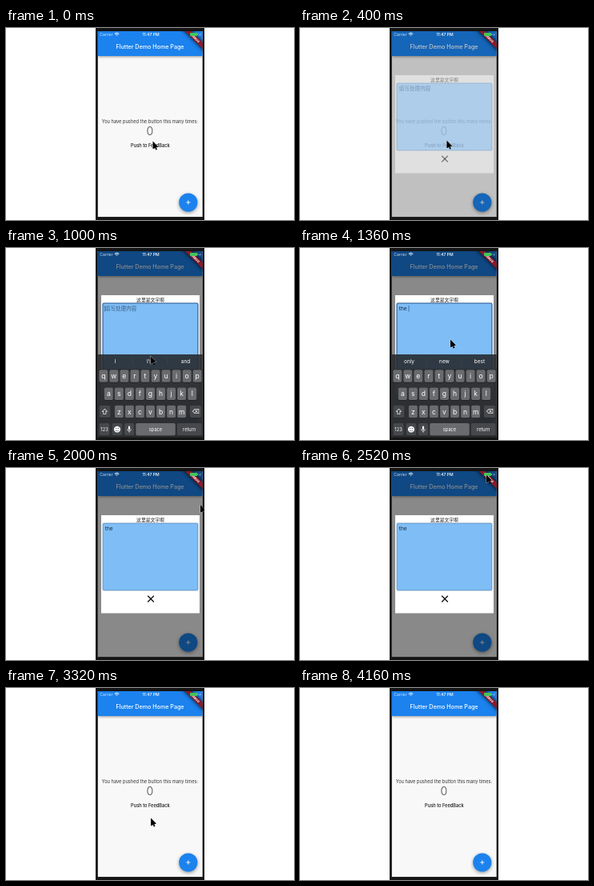
Write an HTML page with a canvas that moves like this. It is 360 by 240 pixels and loops after 4200 ms.

```html
<!DOCTYPE html>
<html lang="en">
<head>
<meta charset="utf-8">
<style>
html, body { margin: 0; width: 360px; height: 240px; overflow: hidden; background: #fff }
canvas { display: block; width: 360px; height: 240px }
</style>
</head>
<body>
<canvas id="stage"></canvas>
<script>
const LOOP = 4200, KEYBOARD_H = 104;
const OPEN = 320, FOCUS = 670, PICK = 1120, BLUR = 1660, CLOSE = 3040;
const LEFT = 114.6, TOP = 4, WIDTH = 131.2, HEIGHT = 232.3;
const SANS = 'Inter, "Noto Sans CJK SC", "Noto Sans CJK", "DejaVu Sans", sans-serif';
const BLUE = '#1b82ee', LIGHT_KEY = '#6a6b6e', DARK_KEY = '#46484b';
const canvas = document.getElementById('stage');
const ctx = canvas.getContext('2d');
const dpr = window.devicePixelRatio || 1;
canvas.width = 360 * dpr;
canvas.height = 240 * dpr;

// Places the pointer visits; each move takes at most MOVE ms and ends at time `at`.
const MOVE = 400;
const stops = [
  { at: 0, x: 183.5, y: 141.5 },
  { at: 760, x: 179, y: 108.5 },
  { at: 1080, x: 181, y: 140 },
  { at: 1360, x: 188, y: 114.5 },
  { at: 1680, x: 243, y: 46 },
  { at: 2520, x: 233, y: 8.5 },
  { at: 2900, x: 181, y: 162.5 },
  { at: 3760, x: 188, y: -14 }
];

const ramp = (t, start, length) => Math.min(1, Math.max(0, (t - start) / length));
const easeOut = p => 1 - (1 - p) ** 2;
const smooth = p => p * p * (3 - 2 * p);

function rect(x, y, w, h, fill, r = 0) {
  ctx.fillStyle = fill;
  ctx.beginPath();
  ctx.roundRect(x, y, w, h, r);
  ctx.fill();
}

function stroke(color, width) {
  ctx.strokeStyle = color;
  ctx.lineWidth = width;
  ctx.stroke();
}

function line(x1, y1, x2, y2, color, width) {
  ctx.beginPath();
  ctx.moveTo(x1, y1);
  ctx.lineTo(x2, y2);
  stroke(color, width);
}

function arc(x, y, r, from, to, color, width) {
  ctx.beginPath();
  ctx.arc(x, y, r, from * Math.PI, to * Math.PI);
  stroke(color, width);
}

function circle(x, y, r, fill) {
  rect(x - r, y - r, 2 * r, 2 * r, fill, r);
}

function text(s, x, y, size, color, weight = 400, align = 'center') {
  ctx.font = `${weight} ${size}px ${SANS}`;
  ctx.textAlign = align;
  ctx.fillStyle = color;
  ctx.fillText(s, x, y + size * 0.36);
}

function placed(x, y, angle, paint) {
  ctx.save();
  ctx.translate(x, y);
  ctx.rotate(angle);
  paint();
  ctx.restore();
}

function cross(x, y, r, angle, color, width) {
  placed(x, y, angle, () => {
    line(-r, 0, r, 0, color, width);
    line(0, -r, 0, r, color, width);
  });
}

function shadowed(color, blur, dy, paint) {
  ctx.save();
  ctx.shadowColor = color;
  ctx.shadowBlur = blur * dpr;
  ctx.shadowOffsetY = dy * dpr;
  paint();
  ctx.restore();
}

function homePage() {
  rect(LEFT, TOP, WIDTH, HEIGHT, '#f8f8f8');
  shadowed('#0006', 3, 1, () => rect(LEFT, TOP, WIDTH, 31, BLUE));
  text('Flutter Demo Home Page', 180, 23.5, 7.15, '#fff', 550);
  text('You have pushed the button this many times:', 180, 117.3, 5.7, '#333');
  text('0', 180, 129.2, 14.2, '#4a4a4a', 300);
  text('Push to FeedBack', 180.4, 147.3, 5.7, '#111', 500);
  shadowed('#0006', 4, 1.5, () => circle(227.8, 218, 11.6, BLUE));
  cross(227.8, 218, 2.6, 0, '#fff', 0.9);
}

function dialog(t) {
  const typed = t >= PICK, focused = t > FOCUS && t < BLUR;
  rect(119, 59, 123, 122.5, '#fff');
  text('这里是文字啊', 180.5, 64.7, 5.8, '#222');
  rect(121, 69, 119, 84, '#7fbdf6', 1.5);
  stroke(focused ? '#22548f' : '#4f7fae', focused ? 1.1 : 0.7);
  text(typed ? 'the' : '填写处理内容', 123.8, 76, 6.6, typed ? '#16283a' : '#3f6385', 400, 'left');
  const caret = typed ? 136 : 123.7;
  if (focused) line(caret, 72, caret, 79.6, '#24548c', 0.7);
  cross(181, 163.6, 5.4, Math.PI / 4, '#111', 1.3);
}

function key(x, y, w, label, size, fill = DARK_KEY) {
  rect(x - w / 2, y - 7.8, w, 16.2, '#1b1c1e', 1.8);
  rect(x - w / 2, y - 7.8, w, 15.6, fill, 1.8);
  text(label, x, y, size, '#fff');
}

function microphone(x, y) {
  rect(x - 1.1, y - 4.3, 2.2, 5, '#fff', 1.1);
  arc(x, y - 0.4, 2.4, 0, 1, '#fff', 0.7);
  line(x, y + 2, x, y + 4, '#fff', 0.7);
}

function keyboard(t, top) {
  ctx.save();
  ctx.translate(0, top);
  rect(LEFT, 0, WIDTH, KEYBOARD_H, 'rgba(36,38,42,.87)');
  rect(LEFT, 18, WIDTH, KEYBOARD_H, 'rgba(44,46,50,.75)');
  const words = t < PICK ? ['I', 'I’m', 'and'] : ['only', 'new', 'best'];
  words.forEach((w, i) => {
    text(w, 136.5 + 44 * i, 8.7, 6.5, '#fff');
    if (i) line(114 + 44 * i, 4, 114 + 44 * i, 14, '#fff2', 0.4);
  });

  const pitch = 13.05, rowY = i => 27 + 22.25 * i;
  ['qwertyuiop', 'asdfghjkl', 'zxcvbnm'].forEach((row, i) =>
    [...row].forEach((c, j) =>
      key(180.5 + pitch * (j - (row.length - 1) / 2), rowY(i), 10.9, c, 8.6, LIGHT_KEY)));
  key(123.5, rowY(2), 14, '⇧', 9);
  key(237, rowY(2), 14, '⌫', 8);

  const y = rowY(3);
  key(123, y, 13.2, '123', 5.7);
  key(139, y, 13, '☻', 9);
  key(154, y, 12, '', 0);
  microphone(154, y);
  key(187, y, 49.5, 'space', 5.7, LIGHT_KEY);
  key(229.2, y, 31, 'return', 5.7);
  ctx.restore();
}

function banner() {
  placed(236.8, 13.2, Math.PI / 4, () => {
    shadowed('#000', 5, 0, () => rect(-22, -2.7, 44, 5.4, '#8c1a2a'));
    text('DEBUG', 0, 0, 3.7, '#fff', 800);
  });
}

function statusBar() {
  text('Carrier', 117.3, 8, 5, '#ffffffcc', 400, 'left');
  text('11:47 PM', 181, 8, 5, '#ffffffe6', 600);
  for (const r of [0.6, 2.4, 4]) arc(138.5, 10.2, r, -0.75, -0.25, '#fff', 0.9);
  rect(230, 5.9, 9, 4.2, '#43c45a', 0.8);
  rect(239.5, 7.2, 0.7, 1.6, '#fff');
  text('⚡', 242.6, 8, 4.5, '#fff');
}

function arrow() {
  placed(3, 7, -0.42, () => rect(-0.9, -1, 1.8, 5, '#000'));
  ctx.beginPath();
  ctx.moveTo(0, 0);
  ctx.lineTo(0, 9.8);
  ctx.lineTo(6.9, 6.9);
  ctx.closePath();
  stroke('#fff', 0.6);
  ctx.fillStyle = '#000';
  ctx.fill();
}

function cursor(t) {
  const i = stops.findIndex(s => s.at > t);
  if (i < 0) return;
  const a = stops[i - 1], b = stops[i];
  const time = Math.min(MOVE, b.at - a.at);
  const p = smooth(ramp(t, b.at - time, time));
  placed(a.x + (b.x - a.x) * p, a.y + (b.y - a.y) * p, 0, arrow);
}

function clipped(x, y, w, h, paint) {
  ctx.save();
  ctx.beginPath();
  ctx.rect(x, y, w, h);
  ctx.clip();
  paint();
  ctx.restore();
}

function screen(t) {
  homePage();
  const shown = ramp(t, OPEN, 160) - ramp(t, CLOSE, 160);
  const raised = easeOut(ramp(t, FOCUS, 250)) - easeOut(ramp(t, BLUR, 250));
  ctx.globalAlpha = shown;
  rect(LEFT, TOP, WIDTH, HEIGHT, 'rgba(0,0,0,.45)');
  dialog(t);
  ctx.globalAlpha = 1;
  if (raised > 0) keyboard(t, 237 - KEYBOARD_H * raised);
  banner();
  statusBar();
}

function draw(t) {
  ctx.setTransform(dpr, 0, 0, dpr, 0, 0);
  rect(0, 0, 360, 240, '#fff');
  clipped(112, 0, 136, 240, () => {
    rect(112, 0, 136, 240, '#151515');
    clipped(LEFT, TOP, WIDTH, HEIGHT, () => screen(t));
    cursor(t);
  });
}

const start = performance.now();
function tick() {
  draw((performance.now() - start) % LOOP);
  requestAnimationFrame(tick);
}
tick();
</script>
</body>
</html>
```
